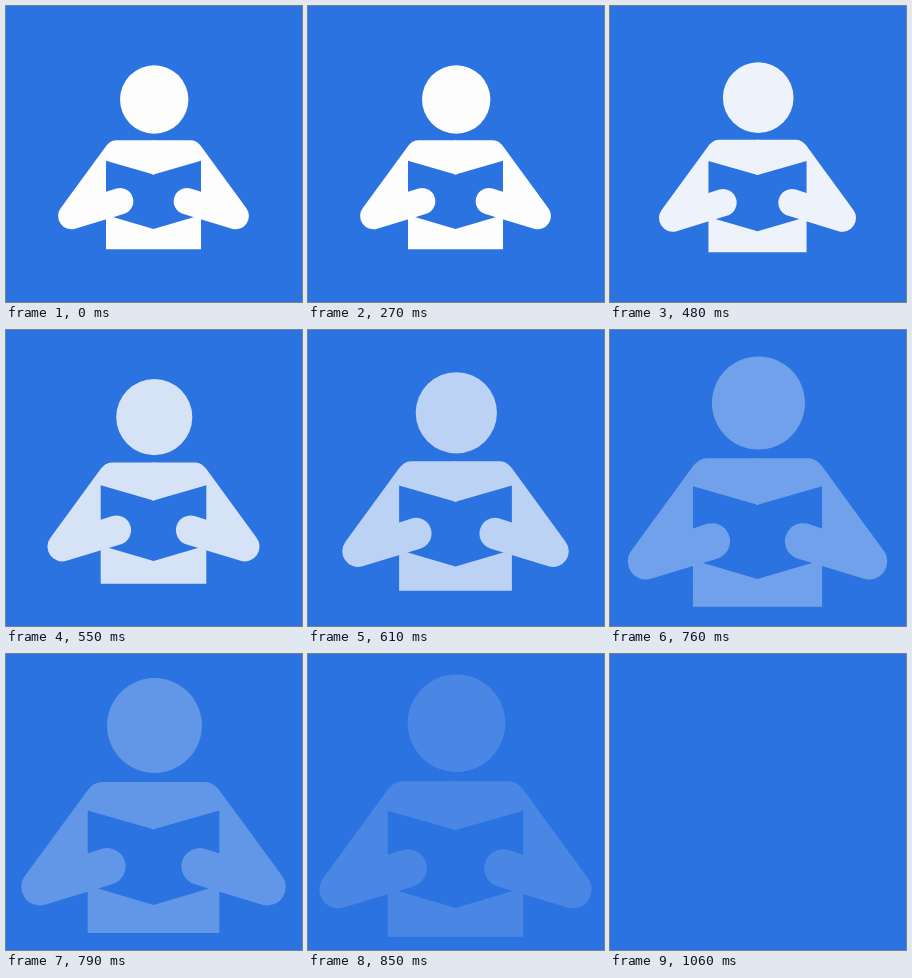
These frames come from a looping animation (296 by 296 pixels, 2.61 s). An HTML page:

```html
<!DOCTYPE html>
<html lang="en">
<head>
<meta charset="utf-8">
<title>Reader</title>
<style>
  html, body { margin: 0; width: 100%; height: 100%; overflow: hidden; background: #2b73e1; }
  svg { display: block; width: 100%; height: 100%; }
</style>
</head>
<body>
<svg viewBox="0 0 296 296">
  <g id="reader" fill="#fdfdfd">
    <circle cx="148.2" cy="93.5" r="34.2"/>
    <path id="side" d="M148.5 134.2H110Q103.5 134.2 98.3 142.5L54.8 202A13.3 13.3 0 0 0 69.1 222.8
      L117.6 208A13.2 13.2 0 0 0 110.5 182.4L100 185.8V154.8L147.5 168.4H148.5Z"/>
    <use href="#side" transform="translate(295) scale(-1 1)"/>
    <path d="M100 209L147.5 223L195 209V243.3H100Z"/>
  </g>
</svg>
<script>
const LOOP = 2610;
const reader = document.getElementById("reader");

const progress = (t, start, duration) => Math.min(1, Math.max(0, (t - start) / duration));
const grow = u => Math.sin(u * Math.PI / 2) ** 1.3;
const easeInOut = u => (1 - Math.cos(u * Math.PI)) / 2;

// The motion advances in small steps: 40 ms at first, then 30 ms.
const stepped = t => t < 520 ? t - t % 40 : t - (t - 520) % 30;

function draw(now) {
  const t = stepped(now % LOOP);
  const scale = 1 + 0.452 * grow(progress(t, 437, 510));
  const opacity = 1 - easeInOut(progress(t, 370, 640));
  reader.setAttribute("transform", `translate(147.5 150.5) scale(${scale}) translate(-147.5 -150.5)`);
  reader.setAttribute("opacity", opacity);
}

const start = performance.now();
function tick() {
  draw(performance.now() - start);
  requestAnimationFrame(tick);
}
tick();
</script>
</body>
</html>
```
